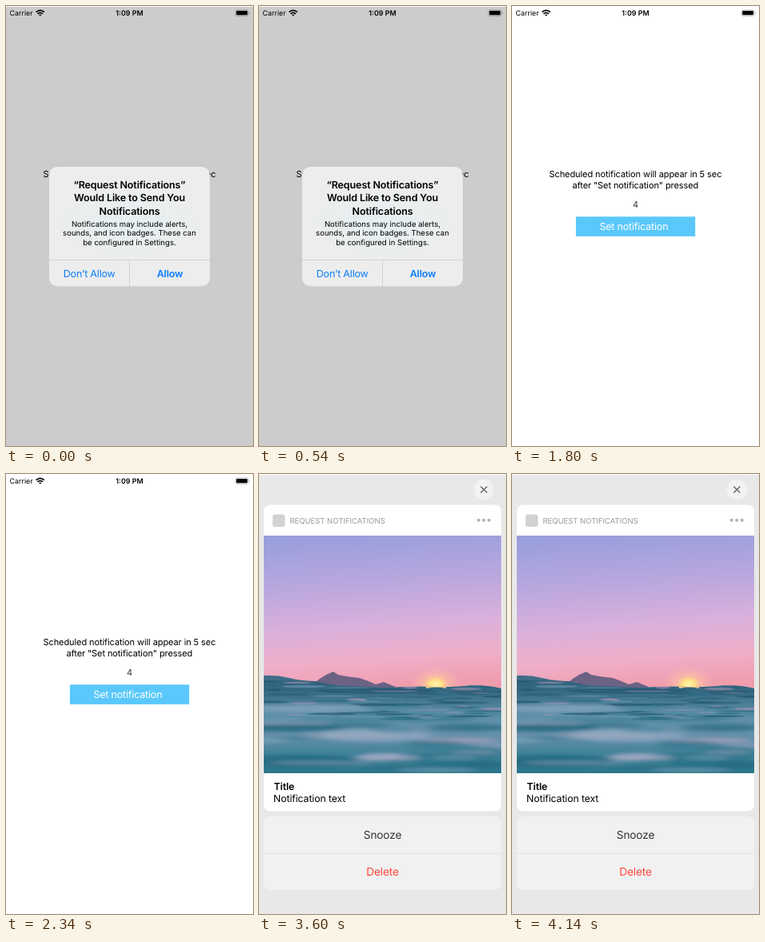
Recreate the animation shown at these times as an HTML page. Size 309x550 px, loop 4500 ms.

```html
<!DOCTYPE html>
<html lang="en">
<head>
<meta charset="utf-8">
<title>Notification request</title>
<style>
  html, body { margin: 0; width: 100%; height: 100%; overflow: hidden; background: #fff; }
  svg.stage { display: block; width: 100vw; height: 100vh; }
  text { font-family: Inter, "Liberation Sans", sans-serif; text-rendering: geometricPrecision; }
  .label { font-size: 11.08px; letter-spacing: -.011em; }
  .action { font-size: 12.56px; letter-spacing: -.016em; }
  .small { font-size: 9.5px; }
  .status { font-size: 8.9px; }
  .semi { font-weight: 600; }
  .mid { text-anchor: middle; }
  .grey { fill: #8c8c8c; }
  .head { font-size: 12.56px; letter-spacing: -.011em; }
  .card { font-size: 12.35px; letter-spacing: -.011em; }
  .big { font-size: 13.75px; letter-spacing: -.014em; }
</style>
</head>
<body>
<svg class="stage" viewBox="0 0 309 550" xmlns="http://www.w3.org/2000/svg">
  <defs>
    <linearGradient id="sky" x1=".1" x2=".2" y2="1">
      <stop offset="0" stop-color="#979edb"/>
      <stop offset=".3" stop-color="#b6a6de"/>
      <stop offset=".6" stop-color="#d9b0dc"/>
      <stop offset=".82" stop-color="#efafc9"/>
      <stop offset="1" stop-color="#f09dae"/>
    </linearGradient>
    <linearGradient id="sea" x2="0" y2="1">
      <stop offset="0" stop-color="#47708c"/>
      <stop offset=".18" stop-color="#33667f"/>
      <stop offset=".42" stop-color="#5c8fa8"/>
      <stop offset=".62" stop-color="#6690aa"/>
      <stop offset=".82" stop-color="#3f8199"/>
      <stop offset="1" stop-color="#2d758b"/>
    </linearGradient>
    <radialGradient id="glow">
      <stop offset="0" stop-color="#fff6b0"/>
      <stop offset=".25" stop-color="#ffe184"/>
      <stop offset=".45" stop-color="#ffc99c" stop-opacity=".6"/>
      <stop offset="1" stop-color="#ffb8b0" stop-opacity="0"/>
    </radialGradient>
    <radialGradient id="tint">
      <stop offset="0" stop-color="#e4f0f1"/>
      <stop offset="1" stop-color="#ededed"/>
    </radialGradient>
    <filter id="fine" x="-10%" y="-10%" width="120%" height="120%"><feGaussianBlur stdDeviation="1.6 .6"/></filter>
    <filter id="soft" x="-10%" y="-10%" width="120%" height="120%"><feGaussianBlur stdDeviation="6 2"/></filter>
    <filter id="shade" x="-10%" y="-20%" width="120%" height="150%">
      <feDropShadow dx="0" dy="3" stdDeviation="5" flood-color="#000" flood-opacity=".11"/>
    </filter>
    <clipPath id="water"><path d="M0 175Q16 174 32 178T66 182Q80 187 104 188T150 190Q190 188 215 189T258 187Q280 187 297 191V297H0Z"/></clipPath>
    <clipPath id="cardClip"><rect x="6" y="38.5" width="297" height="383" rx="8"/></clipPath>
    <clipPath id="thumbClip"><rect x="265.5" y="38" width="26.5" height="27" rx="2.5"/></clipPath>
    <symbol id="photo" viewBox="0 0 297 297">
      <rect width="297" height="195" fill="url(#sky)"/>
      <ellipse cx="215" cy="186" rx="32" ry="23" fill="url(#glow)"/>
      <path d="M66 182Q76 174 87 170L93 174 104 176 120 178 131 182 140 186 150 183 165 189 150 193H66Z" fill="#6b6284"/>
      <g clip-path="url(#water)">
        <rect y="170" width="297" height="127" fill="url(#sea)"/>
        <g id="near" filter="url(#soft)"></g>
        <g id="far" filter="url(#fine)"></g>
        <path d="M203 190Q215 187 228 190" stroke="#ffd08c" stroke-width="2" fill="none"/>
      </g>
    </symbol>
  </defs>

  <g id="main">
    <rect id="page" width="309" height="550" fill="#fff"/>
    <text class="label mid" x="154.4" y="214.4">Scheduled notification will appear in 5 sec</text>
    <text class="label mid" x="154.4" y="228">after "Set notification" pressed</text>
    <text id="count" class="label mid" x="154.5" y="251.6" fill="#333">4</text>
    <rect x="79.9" y="263.3" width="149.3" height="24.6" fill="#5ac8fa"/>
    <text class="action" x="109.4" y="280.2" fill="#fff">Set notification</text>
  </g>

  <g id="bar">
    <text class="status" x="4.6" y="12.2">Carrier</text>
    <g fill="none" stroke="#000" stroke-width="1.7">
      <path d="M37.6 7.7Q42.7 3 47.9 7.7M39.5 9.8Q42.7 7 46 9.8"/>
      <path d="M42.7 12.7L41.1 11Q42.7 9.8 44.4 11Z" fill="#000" stroke="none"/>
    </g>
    <text class="status semi mid" x="154.5" y="12.2" font-size="9.1">1:09 PM</text>
    <g opacity=".35">
      <rect x="287" y="4.9" width="16.2" height="7.5" rx="2" fill="none" stroke="#000" stroke-width=".7"/>
      <path d="M304.1 7.3Q305.6 8.6 304.1 9.9Z"/>
    </g>
    <rect x="288.1" y="6" width="14" height="5.3" rx="1.1"/>
  </g>

  <g id="alert">
    <rect x="54" y="201" width="201" height="149.3" rx="10" fill="#ededed"/>
    <ellipse cx="154" cy="272" rx="98" ry="44" fill="url(#tint)"/>
    <path d="M54 317.5H255M154.5 318V350.3" stroke="#c9cccc" stroke-width=".8"/>
    <g class="mid">
      <g class="head semi">
        <text x="154.5" y="227.6">“Request Notifications”</text>
        <text x="154.5" y="244.1">Would Like to Send You</text>
        <text x="154.5" y="260.5">Notifications</text>
      </g>
      <g font-size="9.6">
        <text x="154.5" y="275.5">Notifications may include alerts,</text>
        <text x="154.5" y="287.4">sounds, and icon badges. These can</text>
        <text x="154.5" y="299.3">be configured in Settings.</text>
      </g>
      <g class="action" fill="#0a7cf8">
        <text x="104.2" y="338.9">Don’t Allow</text>
        <text class="semi" x="205" y="338.9">Allow</text>
      </g>
    </g>
  </g>

  <g id="banner">
    <rect x="5.5" y="3" width="298" height="73" rx="9" fill="#f4f4f4" filter="url(#shade)"/>
    <rect x="13.5" y="14.5" width="14.5" height="14.5" rx="3" fill="#d6d6d6"/>
    <text class="small grey" x="33.3" y="25.6">REQUEST NOTIFICATIONS</text>
    <text class="small grey" x="292.3" y="25.6" text-anchor="end">now</text>
    <text class="label semi" x="14.7" y="46.6">Title</text>
    <text class="label" x="14.3" y="60.6">Notification text</text>
    <g clip-path="url(#thumbClip)"><use href="#photo" x="265.3" y="38" width="27" height="27"/></g>
  </g>

  <g id="detail">
    <rect width="309" height="550" fill="#e8e8e8"/>
    <circle cx="281.3" cy="19.5" r="12.8" fill="#f2f2f2"/>
    <path d="M277.7 15.9l7.2 7.2m0-7.2l-7.2 7.2" stroke="#666" stroke-width="1.4" stroke-linecap="round"/>
    <g clip-path="url(#cardClip)">
      <rect x="6" y="38" width="297" height="384" fill="#fff"/>
      <use href="#photo" x="6" y="77" width="297" height="297"/>
    </g>
    <rect x="17" y="50.5" width="15.5" height="15.5" rx="3.2" fill="#d2d2d2"/>
    <text class="small" x="38.4" y="61.6" fill="#999">REQUEST NOTIFICATIONS</text>
    <g fill="#b4b4b4"><circle cx="274.7" cy="57.8" r="2.1"/><circle cx="281.2" cy="57.8" r="2.1"/><circle cx="287.7" cy="57.8" r="2.1"/></g>
    <text class="card semi" x="18.6" y="395">Title</text>
    <text class="card" x="18.1" y="410">Notification text</text>
    <rect x="6" y="428" width="297" height="92" rx="8" fill="#f1f1f1"/>
    <path d="M6 474.2H303" stroke="#dedede" stroke-width=".8"/>
    <text class="big mid" x="154.5" y="456" fill="#333">Snooze</text>
    <text class="big mid" x="154.5" y="502.3" fill="#ff453a">Delete</text>
  </g>

  <rect width="309" height="1" fill="#fff"/>
</svg>
<script>
const HOLD = 900, SCENES = 5;
const $ = id => document.getElementById(id);

let seed = 11;
const rnd = () => (seed = seed * 16807 % 2147483647) / 2147483647;
const pick = list => list[Math.floor(rnd() * list.length)];

const streak = (x, y, rx, ry, fill, alpha) =>
  `<ellipse cx="${x}" cy="${y}" rx="${rx}" ry="${ry}" fill="${fill}" opacity="${alpha}"/>`;

// Thin dark ripples near the horizon, broad blurred bands in front.
function paintSea() {
  let far = streak(20, 185, 55, 4, '#2f627c', .8) + streak(140, 194, 75, 3.5, '#2b5a75', .8)
    + streak(262, 193, 45, 3, '#3a6680', .8);
  for (let i = 0; i < 80; i++) {
    const y = 182 + i * .6;
    far += streak(rnd() * 297, y, 8 + rnd() * 24, .6 + rnd() * 1.2,
      pick(['#1f5069', '#2a5c76', '#2b6b82', '#6f97b3', '#a493b4']), .6);
  }
  let near = streak(55, 216, 75, 5, '#8fabc6', .7) + streak(30, 240, 70, 5, '#1f667d', .8)
    + streak(140, 250, 70, 8, '#93a9c2', .7) + streak(255, 240, 50, 5, '#2f6c84', .7)
    + streak(245, 256, 50, 3, '#b9a7c2', .7) + streak(155, 277, 40, 5, '#b4b0cb', .8)
    + streak(40, 282, 80, 8, '#1f6a80', .8) + streak(250, 286, 60, 6, '#266f86', .8);
  for (let i = 0; i < 24; i++) {
    near += streak(rnd() * 297, 222 + i * 3.1, 25 + rnd() * 45, 1.5 + rnd() * 2.5,
      pick(['#1f667d', '#28748a', '#86a9c0', '#a3a8c4']), .5);
  }
  $('far').innerHTML = far;
  $('near').innerHTML = near;
}

function show(id, on) {
  $(id).style.display = on ? '' : 'none';
}

function render(ms) {
  const scene = Math.floor(ms / HOLD) % SCENES;
  show('main', scene < 4);
  show('bar', scene < 3);
  show('alert', scene === 0);
  show('count', scene === 2);
  show('banner', scene === 3);
  show('detail', scene === 4);
  $('page').setAttribute('fill', scene ? '#fff' : '#ccc');
}

paintSea();
const start = performance.now();
function tick() {
  render(performance.now() - start);
  requestAnimationFrame(tick);
}
tick();
</script>
</body>
</html>
```
